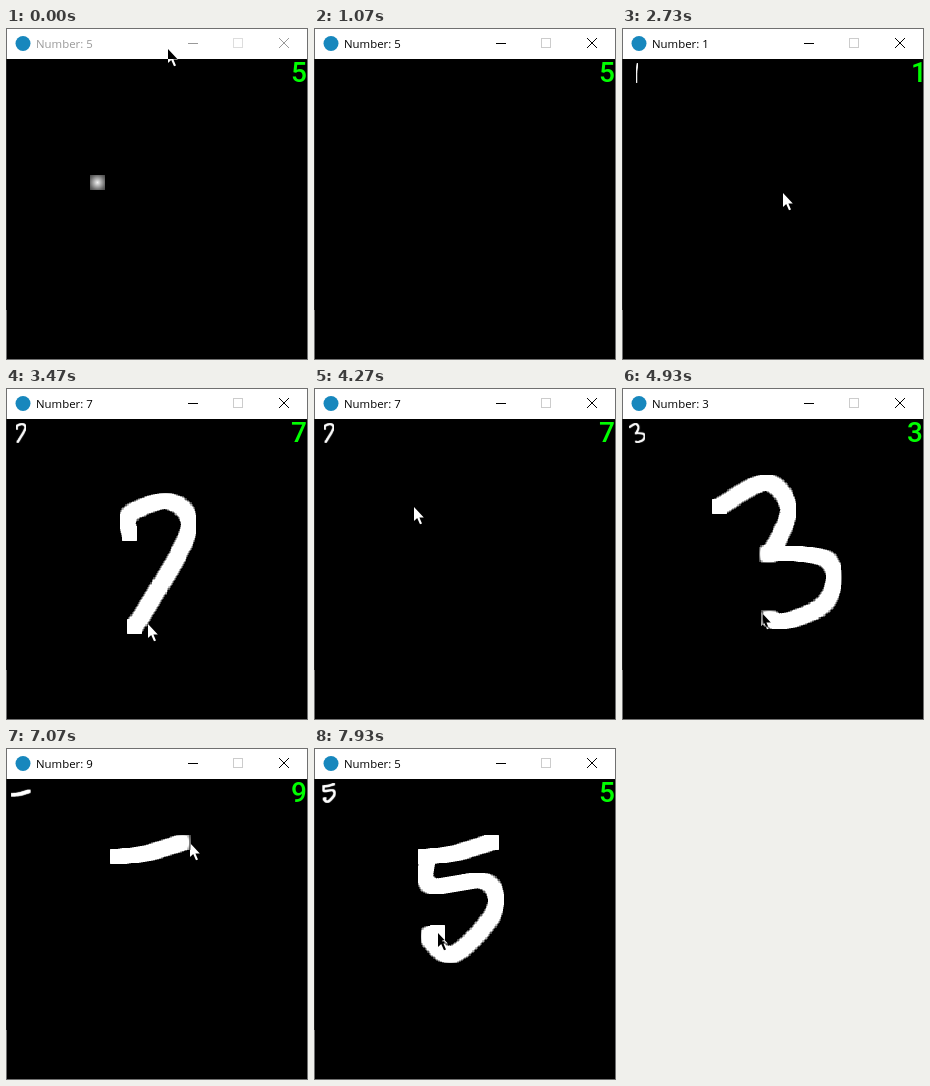
Recreate the animation shown at these times as an HTML page with a canvas. Size 302 by 332 pixels, loop 8 s.

```html
<!DOCTYPE html>
<html lang="en">
<head>
<meta charset="utf-8">
<title>Digit recognition</title>
<style>
  html, body { margin: 0; width: 100%; height: 100%; overflow: hidden; background: #000; }
  canvas { display: block; }
</style>
</head>
<body>
<canvas id="stage" width="302" height="332"></canvas>
<script>
const LOOP = 8000, STEP = 200 / 3;
const FOCUS_TIME = 500, DOT_END = 300;
const BRUSH = 15, SPACING = 2, PRESS = 3;          // pixels, pixels, marks where the pen rests
const SPEED = 0.5;                                 // pen pixels per ms
const INK_LAG = 20, READ_DELAY = 100, WIPE_LEAD = 300; // ms
const BOW = 45;                                    // how far free cursor moves swing to the right

const ctx = document.getElementById('stage').getContext('2d');
const ink = document.createElement('canvas');
ink.width = 302;
ink.height = 332;
const inkCtx = ink.getContext('2d');

// Point on a Catmull-Rom curve through pts; u runs from 0 to 1.
function curve(pts, u) {
  const last = pts.length - 1, i = Math.min(Math.floor(u * last), last - 1), f = u * last - i;
  const at = k => pts[Math.max(0, Math.min(last, k))];
  return [0, 1].map(d => {
    const [a, b, c, e] = [-1, 0, 1, 2].map(k => at(i + k)[d]);
    return b + f / 2 * (c - a + f * (2 * a - 5 * b + 4 * c - e + f * (3 * (b - c) + e - a)));
  });
}

// A pen stroke through key points, as evenly spaced brush marks at constant speed.
function stroke(start, ...keys) {
  const path = [keys[0]];
  let travelled = 0, prev = keys[0];
  for (let u = 0; u <= 1; u += 0.001) {
    const p = curve(keys, u);
    travelled += Math.hypot(p[0] - prev[0], p[1] - prev[1]);
    if (travelled >= path.length * SPACING) path.push(p);
    prev = p;
  }
  return { start, end: start + path.length * SPACING / SPEED, path };
}

const one = stroke(1770, [160, 98], [151, 162], [150, 263]);
const seven = stroke(2950, [124, 146], [125, 126], [165, 114], [182, 146], [129, 240]);
const three = stroke(4280, [98, 119], [145, 95], [167, 122], [150, 165], [150, 165],
  [207, 173], [205, 214], [160, 234], [136, 221]);
const eight = stroke(5635, [119, 106], [95, 140], [91, 162], [150, 182], [146, 234],
  [104, 228], [126, 172], [150, 122], [126, 103]);
const fiveTop = stroke(6910, [112, 109], [140, 106], [180, 94]);
const fiveBowl = stroke(7440, [114, 110], [117, 138], [172, 134], [180, 165], [140, 207], [115, 190], [124, 185]);

// What the recogniser says about the strokes on the canvas.
const guesses = [
  { reading: 1, strokes: [one] },
  { reading: 7, strokes: [seven] },
  { reading: 3, strokes: [three] },
  { reading: 8, strokes: [eight] },
  { reading: 9, strokes: [fiveTop] },
  { reading: 5, strokes: [fiveTop, fiveBowl] }
];

const cursorStops = [
  { start: 0, end: 0, path: [[162, 21]] },
  { start: 330, end: 1270, path: [[325, 165]] },
  one, seven, three, eight, fiveTop, fiveBowl
];

function marksDone({ start, path }, t) {
  return Math.max(0, Math.min(path.length, Math.floor((t - start) * SPEED / SPACING) + 1));
}

function cursorAt(t) {
  const index = cursorStops.findLastIndex(s => s.start <= t);
  const stop = cursorStops[index], next = cursorStops[index + 1];
  const [x, y] = stop.path[marksDone(stop, t) - 1];
  if (t <= stop.end || !next) return [x, y];
  const u = (t - stop.end) / (next.start - stop.end), ease = u * u * (3 - 2 * u);
  const [nx, ny] = next.path[0];
  return [x + (nx - x) * ease + BOW * Math.sin(Math.PI * u), y + (ny - y) * ease];
}

function drawMark([px, py]) {
  const x = Math.round(px), y = Math.round(py);
  const glow = inkCtx.createRadialGradient(x - 0.5, y - 0.5, 0, x - 0.5, y - 0.5, 10.5);
  glow.addColorStop(0, 'rgba(255,255,255,.95)');
  glow.addColorStop(0.7, 'rgba(255,255,255,.42)');
  glow.addColorStop(1, 'rgba(255,255,255,.27)');
  inkCtx.fillStyle = glow;
  inkCtx.fillRect(x - 8, y - 8, BRUSH, BRUSH);
}

function clearInk() {
  inkCtx.clearRect(0, 0, 302, 332);
  inkCtx.globalCompositeOperation = 'lighter';
}

// Draws the strokes made so far and returns their marks.
function drawInk(strokes, t) {
  clearInk();
  return strokes.flatMap(s => {
    const marks = s.path.slice(0, marksDone(s, t));
    marks.forEach(drawMark);
    for (let i = 1; i < PRESS && marks.length; i++) {
      drawMark(marks[0]);
      if (t > s.end) drawMark(marks[marks.length - 1]);
    }
    return marks;
  });
}

// The drawing cropped and scaled into a 20 pixel square.
function drawThumbnail(marks) {
  const xs = marks.map(m => m[0]), ys = marks.map(m => m[1]);
  const left = Math.min(...xs) - 8, top = Math.min(...ys) - 8;
  const w = Math.max(...xs) + 7 - left, h = Math.max(...ys) + 7 - top;
  const scale = 20 / Math.max(w, h);
  ctx.imageSmoothingQuality = 'high';
  ctx.drawImage(ink, left, top, w, h, 15 - w * scale / 2, 45 - h * scale / 2, w * scale, h * scale);
}

function line(color, from, to) {
  ctx.strokeStyle = color;
  ctx.beginPath();
  ctx.moveTo(...from);
  ctx.lineTo(...to);
  ctx.stroke();
}

function drawWindow(active, reading) {
  const color = active ? '#000' : '#999';
  ctx.fillStyle = '#000';
  ctx.fillRect(0, 0, 302, 332);
  ctx.fillStyle = '#fff';
  ctx.fillRect(1, 1, 300, 30);
  ctx.lineWidth = 1;
  ctx.strokeStyle = '#707070';
  ctx.strokeRect(0.5, 0.5, 301, 331);
  line('#222', [0.5, 31], [0.5, 282]);

  ctx.fillStyle = '#1787bd';
  ctx.beginPath();
  ctx.arc(17, 15.5, 7.5, 0, 7);
  ctx.fill();

  ctx.fillStyle = color;
  ctx.font = '11.4px "Open Sans", "Noto Sans", sans-serif';
  ctx.fillText('Number: ' + reading, 30, 20);

  line(color, [182, 15.5], [192, 15.5]);
  ctx.strokeStyle = active ? '#ccc' : '#ddd';
  ctx.strokeRect(227.5, 10.5, 9, 9);
  line(color, [273, 10], [283, 20]);
  line(color, [283, 10], [273, 20]);
}

function drawReading(reading) {
  ctx.fillStyle = '#0f0';
  ctx.font = '500 28px Roboto, "Liberation Sans", sans-serif';
  ctx.fillText(reading, 300 - ctx.measureText(reading).actualBoundingBoxRight, 54);
}

// The pointer inverts whatever lies under it.
function drawCursor([x, y]) {
  ctx.save();
  ctx.translate(Math.round(x), Math.round(y));
  ctx.globalCompositeOperation = 'difference';
  ctx.fillStyle = '#fff';
  ctx.fill(new Path2D('M0 0V14L3.2 11L6 17.2L8 16.4L5.4 10.4H9.8Z'));
  ctx.restore();
}

function draw(t) {
  const penTime = t - INK_LAG;
  const guess = guesses.findLast(g => g.strokes.at(-1).start + READ_DELAY <= t);
  const reading = guess ? guess.reading : 5;
  drawWindow(t >= FOCUS_TIME, reading);
  if (guess) drawThumbnail(drawInk(guess.strokes, penTime));

  const current = guesses.findLast(g => g.strokes[0].start - WIPE_LEAD <= t);
  if (current) drawInk(current.strokes, penTime);
  else {
    clearInk();
    if (t < DOT_END) drawMark([92, 155]);
  }
  ctx.drawImage(ink, 0, 0);
  drawReading(reading);
  drawCursor(cursorAt(t));
}

function tick() {
  const t = performance.now() % LOOP;
  draw(Math.floor((t + 4) / STEP) * STEP);
  requestAnimationFrame(tick);
}
tick();
</script>
</body>
</html>
```
